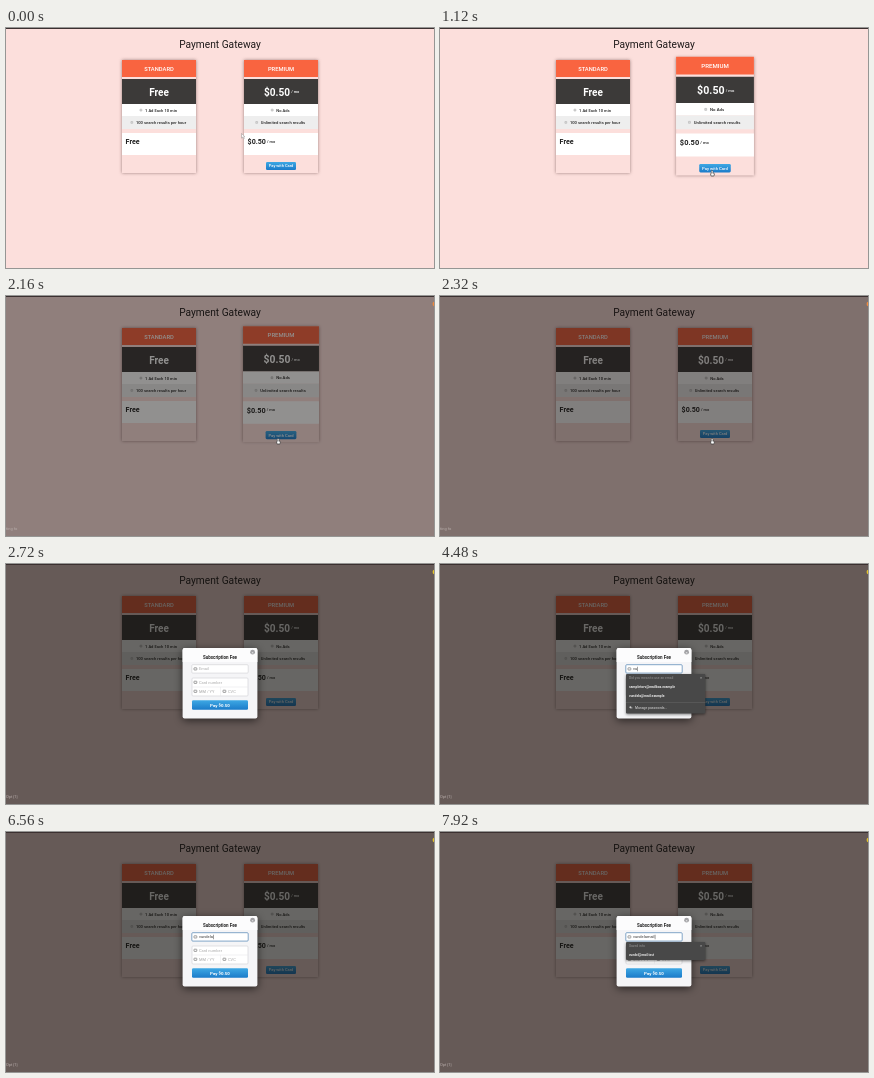
These frames come from a looping animation (428x240 px, 8000 ms). An HTML page with a canvas:

```html
<!DOCTYPE html>
<html lang="en">
<head>
<meta charset="utf-8">
<title>Payment Gateway</title>
<style>
html, body { margin: 0; width: 428px; height: 240px; overflow: hidden; background: #fcdfdc; }
canvas { display: block; }
</style>
</head>
<body>
<canvas id="stage" width="428" height="240"></canvas>
<script>
const c = document.getElementById('stage').getContext('2d');
const LOOP = 8000, STEP = 80;
const TYPED = 'vundelamail';
const KEY_TIMES = [4320, 4480, 5600, 5760, 6320, 6480, 6560, 7680, 7680, 7760, 7920];

const clamp = x => Math.max(0, Math.min(1, x));
const ramp = (t, from, to) => clamp((t - from) / (to - from));
const ease = x => x * x * (3 - 2 * x);

function box(x, y, w, h, fill, radius = 0, stroke) {
  c.beginPath();
  c.roundRect(x, y, w, h, radius);
  c.fillStyle = fill;
  c.fill();
  if (stroke) {
    c.strokeStyle = stroke;
    c.lineWidth = 0.7;
    c.stroke();
  }
}

function disc(x, y, r, fill) {
  c.beginPath();
  c.arc(x, y, r, 0, 7);
  c.fillStyle = fill;
  c.fill();
}

function text(s, x, y, size, color, weight = 400, align = 'left') {
  c.font = `${weight} ${size}px Roboto, sans-serif`;
  c.fillStyle = color;
  c.textAlign = align;
  c.textBaseline = 'alphabetic';
  c.fillText(s, x, y);
  return c.measureText(s).width;
}

function shadowed(color, blur, dy, draw) {
  c.save();
  c.shadowColor = color;
  c.shadowBlur = blur;
  c.shadowOffsetY = dy;
  draw();
  c.restore();
}

function blueButton(x, y, w, h, label, size, weight) {
  const g = c.createLinearGradient(0, y, 0, y + h);
  g.addColorStop(0, '#3ea8e4');
  g.addColorStop(1, '#1b7bc9');
  box(x, y, w, h, g, 1.3);
  text(label, x + w / 2, y + h / 2 + size * 0.36, size, '#fff', weight, 'center');
}

function card(x, name, price, unit, rows, grow = 0) {
  const mid = x + 37, scale = 1 + 0.052 * grow;
  c.save();
  c.translate(mid, 88.5 - 0.4 * grow);
  c.scale(scale, scale);
  c.translate(-mid, -88.5);
  shadowed('rgba(60,30,30,.5)', 3, 0, () => box(x, 32, 74, 113, '#fcdfdc'));
  box(x, 32, 74, 17, '#f96440');
  box(x, 51, 74, 25, '#3c3a39');
  box(x, 76, 74, 12, '#fff');
  box(x, 88, 74, 13, '#eee');
  box(x, 105, 74, 22, '#fff');
  text(name, mid, 42.5, 5.8, '#fff', 500, 'center');
  if (unit) {
    text(price, x + 20, 67.6, 10.1, '#fff', 700);
    text(unit, x + 47.2, 65.4, 3.9, '#fff', 500);
    text(unit, x + 23, 115, 3.9, '#222', 500);
    blueButton(x + 22, 134, 30, 8, 'Pay with Card', 4, 500);
  } else {
    text(price, mid, 67.5, 10, '#fff', 700, 'center');
  }
  text(price, x + 3.6, 116.2, 7.1, '#222', 700);
  rows.forEach((row, i) => {
    const y = 83.6 + i * 12.3;
    const w = text(row, mid + 2, y, 4.1, '#222', 500, 'center');
    box(mid - w / 2 - 3, y - 2.4, 1.8, 1.8, '#ddd', 0, '#bbb');
  });
  c.restore();
}

function arrow(x, y) {
  c.beginPath();
  [[0, 0], [0, 4.6], [1.1, 3.6], [2, 5.4], [2.8, 5], [2, 3.3], [3.4, 3.2]]
    .forEach(([dx, dy]) => c.lineTo(x + dx, y + dy));
  c.closePath();
  c.fillStyle = '#fff';
  c.fill();
  c.strokeStyle = '#777';
  c.lineWidth = 0.4;
  c.stroke();
}

function hand(x, y) {
  box(x - 0.6, y - 2.4, 1.3, 4, '#fff', 0.6, '#333');
  box(x - 1.3, y, 3.6, 3, '#fff', 1, '#333');
  box(x - 0.3, y - 2, 0.8, 3, '#fff');
}

function cursor(t) {
  const k = ease(ramp(t, 0, 960));
  const x = 235.5 + 36.5 * k, y = 105.5 + 39.5 * k;
  t < 800 ? arrow(x, y) : hand(x, y);
}

function fieldIcon(x, y) {
  box(x, y - 1.2, 2.8, 2.2, '#fff', 0.4, '#777');
}

function modal(typed, focused) {
  shadowed('rgba(0,0,0,.6)', 9, 2, () => box(176.6, 84, 74.8, 70.6, '#f5f5f7', 2));
  box(176.6, 84, 74.8, 14, '#fcfcfd', [2, 2, 0, 0]);
  text('Subscription Fee', 214, 95.2, 4.5, '#222', 700, 'center');
  disc(246.6, 88.2, 2.4, '#a3a3a6');
  text('×', 246.6, 89.6, 4, '#eee', 700, 'center');

  box(185.8, 100.7, 56.4, 8.4, '#fff', 1, focused ? '#4f83b4' : '#d5d5d8');
  fieldIcon(188, 105);
  const w = text(typed || 'Email', 193, 106.4, 4, typed ? '#333' : '#aaa');
  if (focused) box(193.3 + (typed ? w : 0), 102.7, 0.5, 4.5, '#444');

  box(186, 114, 56, 18, '#fff', 1, '#d5d5d8');
  box(186, 122.8, 56, 0.4, '#e3e3e6');
  box(214, 123, 0.4, 9, '#e3e3e6');
  [[188, 118.4, 'Card number'], [188, 127.4, 'MM / YY'], [217, 127.4, 'CVC']]
    .forEach(([x, y, label]) => {
      fieldIcon(x, y);
      text(label, x + 5, y + 1.3, 4, '#aaa');
    });
  blueButton(186, 136.3, 56, 9.5, 'Pay $0.50', 4.4, 700);
}

function suggestions(full) {
  const h = full ? 39.5 : 18;
  shadowed('rgba(0,0,0,.5)', 3, 1, () => box(186, 110, 79.3, h, '#484848', 1));
  text(full ? 'Did you mean to use an email' : 'Saved info', 189, 115.3, 3.4, '#999');
  text('×', 261, 115.3, 4, '#bbb', 400, 'center');
  if (!full) {
    text('vundel@mail.test', 189, 124.2, 3.2, '#eee', 700);
    return;
  }
  text('sampletorv@mailbox.example', 189, 124.4, 3.4, '#eee', 700);
  text('vundela@mail.example', 189, 133.4, 3.4, '#eee', 700);
  box(186, 138.3, 79.3, 0.5, '#666');
  disc(190.4, 143.2, 1, '#ccc');
  box(190.4, 143.6, 2, 0.7, '#ccc');
  text('Manage passwords...', 195, 145.1, 3.4, '#ddd');
}

function draw(t) {
  const grow = ease(ramp(t, 160, 800)) * (1 - ramp(t, 2000, 2320));
  box(0, 0, 428, 240, '#fcdfdc');
  text('Payment Gateway', 214, 20, 10.2, '#1f1a1a', 400, 'center');
  card(116, 'STANDARD', 'Free', '', ['1 Ad Each 10 min', '100 search results per hour']);
  card(238, 'PREMIUM', '$0.50', '/ mo', ['No Ads', 'Unlimited search results'], grow);

  const dim = 0.46 * ramp(t, 1840, 2160) + 0.175 * ramp(t, 2160, 2560);
  box(0, 0, 428, 240, `rgba(17,15,12,${dim})`);
  box(0, 0, 428, 1, '#3b3030');
  if (t < 2640) cursor(t);
  if (t >= 2000) {
    disc(429, 8, 2.4, t < 2640 ? '#f28a3c' : '#e5c52a');
    text(t < 2640 ? 'ting fo' : 'Opt [1]', 0, 234.4, 4, '#b9aeac');
  }

  const shown = ramp(t, 2320, 2640);
  if (!shown) return;
  c.globalAlpha = shown;
  modal(TYPED.slice(0, KEY_TIMES.filter(k => k <= t).length), t >= 3920);
  c.globalAlpha = 1;
  if (t >= 3920 && t < 4720) suggestions(true);
  if (t >= 7680) suggestions(false);
}

// Motion advances four steps, then rests for one.
function heldTime(ms) {
  const n = Math.floor((ms % LOOP) / STEP);
  return (n % 5 === 3 ? n - 1 : n) * STEP;
}

const start = performance.now();
function tick() {
  draw(heldTime(performance.now() - start));
  requestAnimationFrame(tick);
}
tick();
</script>
</body>
</html>
```
